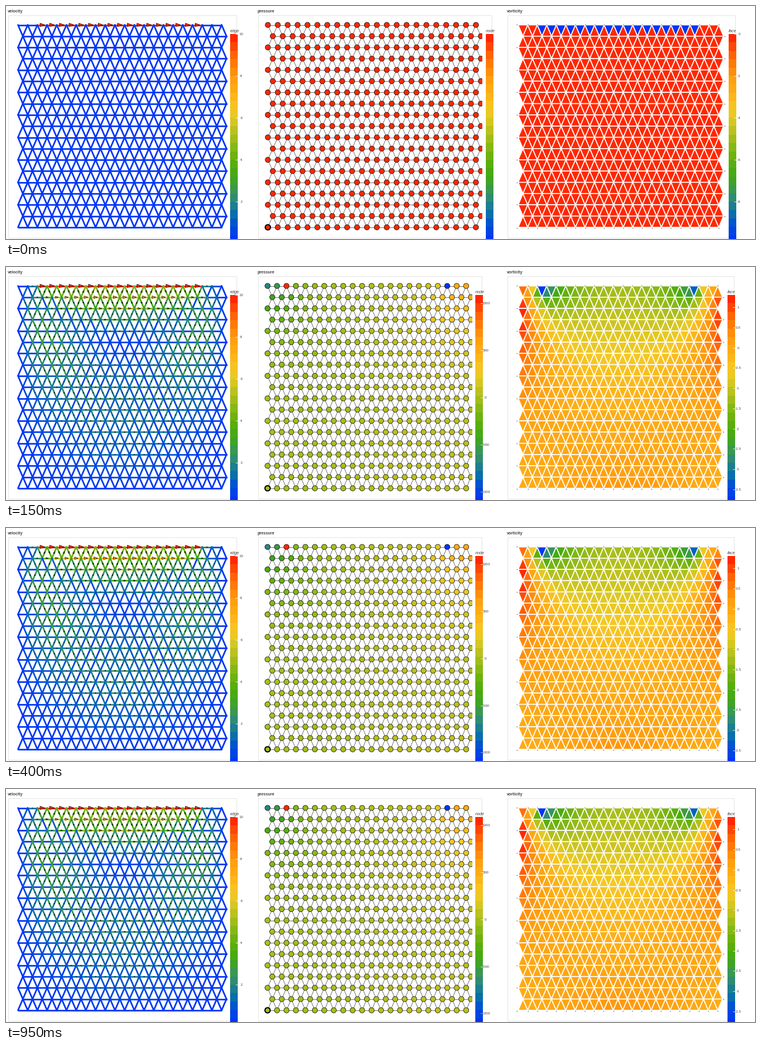
Recreate the animation shown at these times as a matplotlib script. Size 1280 px wide and 400 px high, loop 10 s.

```python
import numpy as np
import matplotlib.pyplot as plt
from matplotlib.animation import FuncAnimation
from matplotlib.collections import LineCollection, PolyCollection, EllipseCollection
from matplotlib.colors import LinearSegmentedColormap
from matplotlib.patches import Rectangle

PT = 0.9                      # points per pixel at 80 dpi
COLS, ROWS = 22, 19
TOP, ROW_H = 32.5, 19.3
BAR_TOP, BAR_H, BAR_W, BLOCKS = 48, 360, 13, 25
LID_SPEED, LAST_STEP = 10, 19
SETTLE = np.log(2.3)          # decay of the slowest mode per step
PRESSURE_SPAN = 2229          # settled pressure range

plt.rcParams["font.family"] = "Liberation Sans"

STOPS = [
    (0, (0, 53, 245)), (.05, (0, 70, 225)), (.092, (0, 90, 200)),
    (.13, (10, 113, 168)), (.2, (45, 138, 120)), (.25, (57, 152, 78)),
    (.3, (65, 165, 30)), (.35, (75, 172, 12)), (.4, (100, 176, 13)),
    (.45, (128, 183, 20)), (.5, (160, 188, 25)), (.55, (192, 194, 30)),
    (.6, (225, 200, 35)), (.65, (245, 200, 35)), (.72, (253, 178, 24)),
    (.8, (255, 158, 14)), (.86, (255, 130, 8)), (.92, (255, 98, 4)),
    (1, (255, 40, 0)),
]
CMAP = LinearSegmentedColormap.from_list(
    "flow", [(t, tuple(c / 255 for c in rgb)) for t, rgb in STOPS], N=512)


# ---- triangular mesh -------------------------------------------------

def node(r, i):
    return r * COLS + i


row, col = np.divmod(np.arange(ROWS * COLS), COLS)
grid_x = col + 0.5 * (row % 2)
grid_y = TOP + ROW_H * row

edges = [(node(r, i), node(r, i + 1)) for r in range(ROWS) for i in range(COLS - 1)]
faces = []
for r in range(ROWS - 1):
    even, odd = (r, r + 1) if r % 2 == 0 else (r + 1, r)
    for i in range(COLS):
        edges.append((node(even, i), node(odd, i)))
        if i < COLS - 1:
            edges.append((node(even, i + 1), node(odd, i)))
            faces.append((node(even, i), node(even, i + 1), node(odd, i)))
            faces.append((node(odd, i), node(odd, i + 1), node(even, i + 1)))
index = {e: k for k, e in enumerate(edges)}
edges, faces = np.array(edges), np.array(faces)

grad = np.zeros((len(edges), ROWS * COLS))
grad[np.arange(len(edges)), edges[:, 0]] = -1
grad[np.arange(len(edges)), edges[:, 1]] = 1

curl = np.zeros((len(faces), len(edges)))
for f, (a, b, c) in enumerate(faces):
    area = ((grid_x[b] - grid_x[a]) * (grid_y[c] - grid_y[a])
            - (grid_x[c] - grid_x[a]) * (grid_y[b] - grid_y[a]))
    turn = -np.sign(area)     # screen y points down
    for p, q in ((a, b), (b, c), (c, a)):
        if (p, q) in index:
            curl[f, index[p, q]] = turn
        else:
            curl[f, index[q, p]] = -turn


# ---- lid-driven viscous flow -----------------------------------------

rim = np.abs(curl).sum(axis=0) == 1
on_top = (row[edges] == 0).all(axis=1)
first = col[edges[:, 0]]
lid = on_top & (first >= 2) & (first <= 18)
free = ~rim | (on_top & ~lid)
u_lid = np.where(lid, float(LID_SPEED), 0.0)
outflow = -grad.T @ u_lid

keep = np.abs(curl[:, ~free]).sum(axis=1) == 0
basis = curl.T[:, keep]
spin = curl @ basis
stiff = spin.T @ spin
psi_end = -np.linalg.solve(stiff, spin.T @ (curl @ u_lid))

chol = np.linalg.cholesky(basis.T @ basis)
inv_chol = np.linalg.inv(chol)
system = inv_chol @ stiff @ inv_chol.T
rates, modes = np.linalg.eigh((system + system.T) / 2)
weights = modes.T @ (chol.T @ psi_end)
to_psi = inv_chol.T @ modes
dt = SETTLE / rates[0]
fit_pressure = np.linalg.pinv(grad[free])
CORNER = node(ROWS - 1, 0)


def flow(step):
    if step == 0:
        return u_lid, np.zeros(ROWS * COLS), curl @ u_lid
    psi = psi_end - to_psi @ (np.exp(-rates * dt * step) * weights)
    u = u_lid + basis @ psi
    w = curl @ u
    force = grad @ outflow - curl.T @ w
    p = fit_pressure @ force[free]
    p -= p[node(ROWS - 1, 1)]
    p[CORNER] = 0
    return u, p, w


states = [flow(k) for k in range(LAST_STEP + 1)]
viscosity = PRESSURE_SPAN / np.ptp(states[-1][1])


def shade(values, low, high):
    if high - low < 1e-9:
        return CMAP(np.ones(len(values)))
    return CMAP((values - low) / (high - low))


# ---- drawing ---------------------------------------------------------

fig = plt.figure(figsize=(16, 5), dpi=80, facecolor="white")
ax = fig.add_axes([0, 0, 1, 1])
ax.set_xlim(0, 1280)
ax.set_ylim(400, 0)
ax.axis("off")


def points(x0, pitch):
    return np.column_stack([x0 + pitch * grid_x, grid_y])


def panel(x, width, title):
    ax.text(x, 11, title, size=7 * PT, weight="bold", color="#444444", va="baseline")
    box = Rectangle((x + .5, 15.5), width, 382, fill=False, ec="#e5e5e5", lw=PT, zorder=0)
    return ax.add_patch(box)


class ColorBar:
    def __init__(self, name, label_dx):
        self.label_dx = label_dx
        self.blocks = PolyCollection([], facecolors=CMAP(np.linspace(1, 0, BLOCKS)),
                                     edgecolors="none", antialiased=False, zorder=6)
        self.marks = LineCollection([], colors="white", linewidths=.8 * PT, zorder=7)
        ax.add_collection(self.blocks)
        ax.add_collection(self.marks)
        self.name = ax.text(0, 45, name, size=7.2 * PT, style="italic", color="#444444")
        self.texts = [ax.text(0, 0, "", size=6.2 * PT, color="#444444", ha="center",
                              va="center_baseline", zorder=8) for _ in range(10)]

    def update(self, x, low, high, step):
        ys = BAR_TOP + BAR_H / BLOCKS * np.arange(BLOCKS + 1)
        self.blocks.set_verts([[(x, a), (x + BAR_W, a), (x + BAR_W, b), (x, b)]
                               for a, b in zip(ys, ys[1:])])
        self.name.set_x(x)
        ticks = []
        if high - low > 1e-9:
            first_tick = int(np.floor(high / step + 1e-6))
            for n in range(first_tick, first_tick - len(self.texts), -1):
                y = BAR_TOP + (high - n * step) / (high - low) * BAR_H
                if y < 404:
                    ticks.append((y, f"{n * step:g}"))
        right = x + BAR_W
        self.marks.set_segments([[(right - 4, y), (right, y)] for y, _ in ticks])
        for k, text in enumerate(self.texts):
            text.set_text(ticks[k][1] if k < len(ticks) else "")
            if k < len(ticks):
                text.set_position((x + self.label_dx, ticks[k][0]))


# velocity on edges
panel(3, 390.5, "velocity")
vel_pts = points(20.5, 16.57)
vel_ends = vel_pts[edges]
vel_mid = vel_ends.mean(axis=1)
vel_dir = vel_ends[:, 1] - vel_ends[:, 0]
vel_dir /= np.linalg.norm(vel_dir, axis=1)[:, None]
vel_lines = LineCollection(vel_ends, linewidths=2.7 * PT, capstyle="round", zorder=2)
arrows = PolyCollection([], edgecolors="black", linewidths=.7 * PT, zorder=3)
ax.add_collection(vel_lines)
ax.add_collection(arrows)
vel_bar = ColorBar("edge", 19)
vel_bar.update(383, 0, LID_SPEED, 2)

# pressure on nodes
prs_box = panel(430, 399.5, "pressure")
prs_lines = LineCollection([], colors="#222222", linewidths=.6 * PT, zorder=2)
prs_clip = Rectangle((430, 15), 383.5, 383, transform=ax.transData)
ax.add_collection(prs_lines)
prs_lines.set_clip_path(prs_clip)
prs_dots = []
for x0, pitch in ((447.5, 16.93), (447, 16.16)):
    ring = np.where(np.arange(ROWS * COLS) == CORNER, 2, .7) * PT
    dots = EllipseCollection(9, 9, 0, units="xy", offsets=points(x0, pitch),
                             transOffset=ax.transData, edgecolors="black",
                             linewidths=ring, zorder=3)
    ax.add_collection(dots)
    dots.set_clip_path(prs_clip)
    prs_dots.append(dots)
prs_bar = ColorBar("node", 18.5)

# vorticity on faces
vor_box = panel(856, 389, "vorticity")
vor_faces = PolyCollection([], edgecolors="white", linewidths=1.6 * PT, zorder=2)
vor_dots, = ax.plot([], [], "o", ms=1.5 * PT, mew=0, color="#555555", zorder=3)
ax.add_collection(vor_faces)
vor_bar = ColorBar("face", 18)
rim_shift = np.column_stack([
    np.where((col == 0) & (row % 2 == 0), -2, 0) + np.where((col == 21) & (row % 2 == 1), 2, 0),
    np.where(row == 0, -.8, 0) + np.where(row == ROWS - 1, .8, 0)])
on_rim = np.abs(rim_shift).sum(axis=1) > 0


def arrow_shapes(u, shown):
    size = np.abs(u[shown])[:, None]
    ahead = vel_dir[shown] * np.sign(u[shown])[:, None] * size
    side = np.column_stack([-ahead[:, 1], ahead[:, 0]])
    mid = vel_mid[shown]
    back = mid - .38 * ahead
    return np.stack([mid + .45 * ahead, back + .29 * side, back - .29 * side], axis=1)


def draw(frame):
    if frame > LAST_STEP:
        return []
    start = frame == 0
    u, p, w = states[frame]
    p = p * viscosity

    speed = np.abs(u)
    tint = shade(speed, 0, LID_SPEED)
    shown = speed > 1
    vel_lines.set_color(tint)
    arrows.set_verts(arrow_shapes(u, shown))
    arrows.set_facecolor(tint[shown])

    prs_box.set_width(399.5 if start else 382)
    prs_clip.set_width(383.5 if start else 366.5)
    prs_lines.set_segments((points(447.5, 16.93) if start else points(447, 16.16))[edges])
    prs_lines.set_clip_path(prs_clip)
    for dots, visible in zip(prs_dots, (start, not start)):
        dots.set_visible(visible)
        dots.set_clip_path(prs_clip)
        dots.set_facecolor(shade(p, p.min(), p.max()))
    prs_bar.update(819.5 if start else 801.5, p.min(), p.max(), 500)

    vor_box.set_width(389 if start else 387.5)
    pts = points(875.3, 16.32 if start else 16.24)
    vor_faces.set_verts(pts[faces])
    vor_faces.set_facecolor(shade(w, w.min(), w.max()))
    vor_dots.set_data(*(pts + rim_shift)[on_rim].T)
    vor_bar.update(1235 if start else 1233, w.min(), w.max(), 2 if start else .5)
    return []


anim = FuncAnimation(fig, draw, frames=200, interval=50, repeat=True,
                     repeat_delay=0, blit=False)
plt.show()
```
